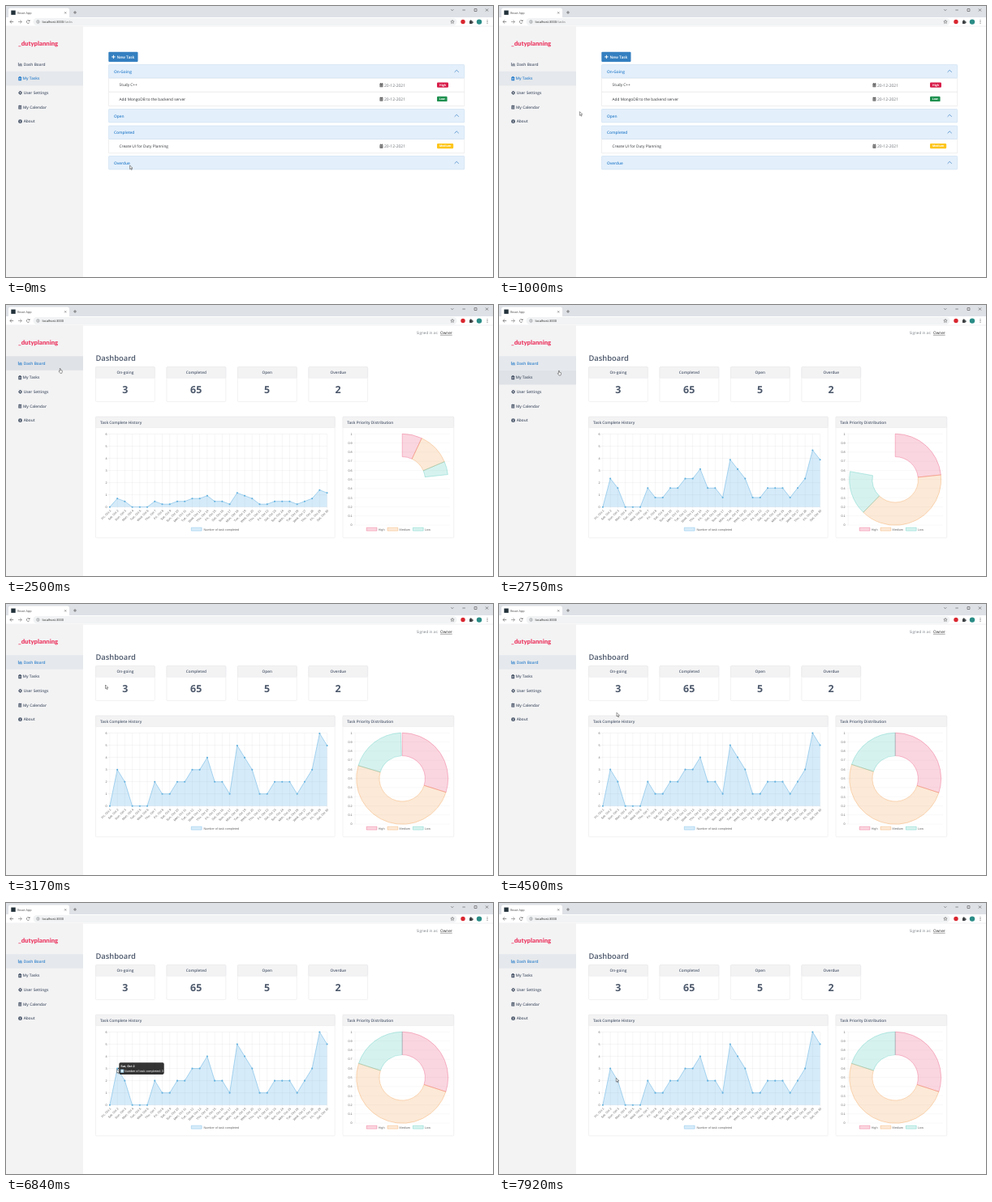
An HTML page with a canvas that plays this animation: 600x335 px, repeating every 8 s.

```html
<!DOCTYPE html>
<html lang="en">
<head>
<meta charset="utf-8">
<title>Task dashboard</title>
<style>
  html, body { margin: 0; width: 100%; height: 100%; overflow: hidden; background: #fff; }
  canvas { display: block; width: 600px; height: 335px; }
</style>
</head>
<body>
<canvas id="stage"></canvas>
<script>
const W = 600, H = 335, LOOP = 8000, STEP = LOOP / 96;
const DASH_AT = 2416, CHART_AT = 2436;
const UI = '"Open Sans", "Noto Sans", sans-serif';
const CHART = '"Liberation Sans", Arial, sans-serif';
const INK = '#4c586b', BLUE = '#2f80cc', GRID = 'rgba(0,0,0,.1)';

const canvas = document.getElementById('stage');
const ctx = canvas.getContext('2d');
const dpr = window.devicePixelRatio || 1;
canvas.width = W * dpr;
canvas.height = H * dpr;
ctx.scale(dpr, dpr);
ctx.textRendering = 'geometricPrecision';

// ---------- drawing helpers ----------
function rect(x, y, w, h, fill, line, r = 0) {
  ctx.beginPath();
  ctx.roundRect(x, y, w, h, r);
  if (fill) { ctx.fillStyle = fill; ctx.fill(); }
  if (line) { ctx.strokeStyle = line; ctx.lineWidth = 0.5; ctx.stroke(); }
}
function disc(x, y, r, fill) {
  ctx.beginPath();
  ctx.arc(x, y, r, 0, Math.PI * 2);
  ctx.fillStyle = fill;
  ctx.fill();
}
function poly(points, line, width = 0.6, fill = null, close = false) {
  ctx.beginPath();
  points.forEach(([x, y], i) => i ? ctx.lineTo(x, y) : ctx.moveTo(x, y));
  if (close) ctx.closePath();
  if (fill) { ctx.fillStyle = fill; ctx.fill(); }
  if (line) { ctx.strokeStyle = line; ctx.lineWidth = width; ctx.stroke(); }
}
// cy is the vertical middle of the capitals
function text(s, x, cy, size, color = INK, weight = 400, align = 'left', font = UI) {
  ctx.font = `${weight} ${size}px ${font}`;
  ctx.textAlign = align;
  ctx.fillStyle = color;
  ctx.fillText(s, x, cy + size * 0.36);
}
const label = (s, x, cy, align = 'left', color = '#666', weight = 400) =>
  text(s, x, cy, 3.75, color, weight, align, CHART);
const clamp = v => Math.max(0, Math.min(1, v));

// ---------- browser frame ----------
function drawBrowser(url, path) {
  rect(0, 0, W, 14, '#dee1e6');
  rect(3, 2.5, 75, 14, '#fff', null, 2.5);
  rect(0, 14, W, 11, '#fff');
  rect(6.3, 5.5, 5.4, 5.4, '#23323a');
  text('React App', 14, 8.3, 3.75, '#444');
  const cross = (x, y, r, c) => {
    poly([[x - r, y - r], [x + r, y + r]], c, 0.5);
    poly([[x + r, y - r], [x - r, y + r]], c, 0.5);
  };
  cross(73.2, 8.4, 1.1, '#444');
  poly([[83, 8], [87, 8]], '#444', 0.6);
  poly([[85, 6], [85, 10]], '#444', 0.6);
  poly([[548.3, 4.2], [549.8, 5.7], [551.3, 4.2]], '#333', 0.5);
  poly([[562.4, 5], [565.8, 5]], '#333', 0.5);
  rect(577, 3.5, 3, 3, null, '#333');
  cross(592.5, 5, 1.6, '#333');

  const arrow = (x, d, c) => {
    poly([[x - 2.2, 19.5], [x + 2.2, 19.5]], c, 0.6);
    poly([[x, 19.5 - 2], [x + 2.2 * d, 19.5], [x, 19.5 + 2]], c, 0.6);
  };
  arrow(7, -1, '#555');
  arrow(17.2, 1, '#777');
  ctx.beginPath();
  ctx.arc(27.3, 19.5, 1.9, 0.4, 5.4);
  ctx.strokeStyle = '#555';
  ctx.lineWidth = 0.6;
  ctx.stroke();
  poly([[29.4, 17.1], [29.4, 19], [27.6, 19]], null, 0, '#555', true);

  rect(33.5, 15, 522, 9, '#f1f3f4', null, 4.5);
  ctx.beginPath();
  ctx.arc(39.4, 19.5, 1.8, 0, Math.PI * 2);
  ctx.strokeStyle = '#5f6368';
  ctx.lineWidth = 0.45;
  ctx.stroke();
  rect(39.15, 19.1, 0.5, 1.4, '#5f6368');
  rect(39.15, 18.2, 0.5, 0.5, '#5f6368');
  text(url, 44.5, 19.5, 3.95, '#222');
  text(path, 44.5 + ctx.measureText(url).width, 19.5, 3.95, '#777');

  const star = Array.from({ length: 10 }, (_, i) => {
    const a = i * Math.PI / 5, r = i % 2 ? 1 : 2.3;
    return [550 + r * Math.sin(a), 19.6 - r * Math.cos(a)];
  });
  poly(star, '#555', 0.5, null, true);
  disc(563, 19.5, 2.7, '#d9252f');
  rect(571, 18.3, 3.6, 3.6, '#3c4043', null, 0.5);
  disc(572.7, 18.1, 0.9, '#3c4043');
  disc(574.9, 20.1, 0.9, '#3c4043');
  disc(583, 19.6, 3.2, '#2a8c86');
  for (const y of [17.7, 19.5, 21.3]) disc(593, y, 0.5, '#444');
  rect(0, 24.8, W, 0.4, '#e4e4e6');
}

// ---------- sidebar ----------
const ROW_TOP = 63.2, ROW_H = 17.65;
const icons = {
  bars(c) {
    poly([[15.4, -2], [15.4, 1.8], [20, 1.8]], c, 0.7);
    [[16.4, 1.4], [17.5, 2.6], [18.6, 2]].forEach(([x, h]) => rect(x, 1.2 - h, 0.8, h, c));
  },
  clipboard(c) {
    rect(15.3, -2, 3.8, 4.5, c, null, 0.5);
    rect(16.3, -2.6, 1.8, 1.3, c, null, 0.4);
    rect(16.1, -0.3, 2.2, 0.4, '#fff');
    rect(16.1, 0.9, 2.2, 0.4, '#fff');
  },
  cog(c) {
    for (let i = 0; i < 4; i++) {
      const a = i * Math.PI / 4, x = 2.4 * Math.cos(a), y = 2.4 * Math.sin(a);
      poly([[17.6 - x, -y], [17.6 + x, y]], c, 1);
    }
    disc(17.6, 0, 1.8, c);
    disc(17.6, 0, 0.8, '#f3f3f4');
  },
  calendar(c) {
    rect(15.3, -1.9, 3.9, 4.4, c, null, 0.5);
    rect(16, -2.6, 0.7, 1.2, c);
    rect(17.8, -2.6, 0.7, 1.2, c);
    rect(15.3, -0.8, 3.9, 0.35, '#f3f3f4');
    for (const y of [0.2, 1.3]) for (const x of [16, 17, 18]) rect(x, y, 0.5, 0.5, '#f3f3f4');
  },
  info(c) {
    disc(17.5, 0, 2.4, c);
    rect(17.2, -0.4, 0.7, 1.8, '#fff');
    rect(17.2, -1.5, 0.7, 0.7, '#fff');
  }
};
const MENU = [
  ['Dash Board', 'bars', 21.7], ['My Tasks', 'clipboard', 20.6], ['User Settings', 'cog', 21.7],
  ['My Calendar', 'calendar', 20.9], ['About', 'info', 21.7]
];
function drawSidebar(active, hover) {
  rect(0, 25, 95, H - 25, '#f3f3f4');
  text('_dutyplanning', 15, 45.8, 7.7, '#ec3f67', 900, 'left', 'Lato, sans-serif');
  MENU.forEach(([name, icon, x], i) => {
    const top = ROW_TOP + i * ROW_H, cy = top + ROW_H / 2;
    if (i === hover) rect(0, top, 95, ROW_H, '#dfe2e7');
    else if (i === active) rect(0, top, 95, ROW_H, '#e5e8ec');
    const color = i === active ? BLUE : INK;
    ctx.save();
    ctx.translate(0, cy);
    icons[icon](color);
    ctx.restore();
    text(name, x, cy, 4.8, color, 600);
  });
}

// ---------- task list ----------
function drawHeader(name, y) {
  rect(126.5, y, 438.2, 16.5, '#e3effb', '#c3d9ee', 0.8);
  text(name, 133, y + 8.4, 4.8, BLUE, 600);
  poly([[552.6, y + 9.3], [555.2, y + 6.8], [557.8, y + 9.3]], '#3b82c4', 0.7);
}
function drawTask(name, y, level, color, width) {
  rect(126.5, y, 438.2, 17.3, '#fff', '#dfdfdf');
  const cy = y + 8.7;
  text(name, 139.6, cy, 4.75, '#303236');
  ctx.save();
  ctx.translate(445.2, cy);
  icons.calendar('#555');
  ctx.restore();
  text('20-12-2021', 466, cy, 5, '#6b6f75');
  rect(531, cy - 3.3, width, 6.4, color, null, 1.2);
  text(level, 531 + width / 2, cy - 0.1, 3.5, '#fff', 700, 'center');
}
function drawTasks() {
  rect(126.3, 56.7, 36.2, 12.3, '#347fc0', null, 1);
  poly([[130.2, 62.9], [134.6, 62.9]], '#fff', 1);
  poly([[132.4, 60.7], [132.4, 65.1]], '#fff', 1);
  text('New Task', 136.4, 62.9, 4.85, '#fff', 600);
  drawTask('Study C++', 89, 'High', '#d81e4b', 14);
  drawTask('Add MongoDB to the backend server', 106.3, 'Low', '#1f9150', 12.6);
  drawTask('Create UI for Duty Planning', 164.5, 'Medium', '#fdc51c', 20.2);
  drawHeader('On-Going', 72.5);
  drawHeader('Open', 127.5);
  drawHeader('Completed', 148);
  drawHeader('Overdue', 185.5);
}

// ---------- dashboard ----------
const DONE = [0, 3, 2, 0, 0, 0, 2, 1, 1, 2, 2, 3, 3, 4, 2, 2, 1, 5, 4, 3, 1, 1, 2, 2, 2, 1, 2, 3, 6, 5];
const DAYS = ['Fri', 'Sat', 'Sun', 'Mon', 'Tue', 'Wed', 'Thu'];
const LINE = { left: 127.9, right: 395.6, top: 159.5, base: 249.7 };
const lineX = i => LINE.left + i * (LINE.right - LINE.left) / 29;
const lineY = v => LINE.base - v * (LINE.base - LINE.top) / 6;

function drawCard(x, y, w, h, head) {
  rect(x, y, w, h, '#fff', '#e4e4e6', 0.8);
  rect(x, y, w, head, '#f3f3f4', '#e4e4e6', 0.8);
}
function drawLineChart(grow) {
  for (let v = 0; v <= 6; v++) {
    poly([[LINE.left - 2.4, lineY(v)], [LINE.right, lineY(v)]], GRID, 0.4);
    label(v, 124.6, lineY(v), 'right');
  }
  DONE.forEach((_, i) => {
    const x = lineX(i);
    poly([[x, LINE.top], [x, LINE.base + 2.4]], GRID, 0.4);
    ctx.save();
    ctx.translate(x + 0.7, LINE.base + 3.6);
    ctx.rotate(-Math.PI / 4);
    label(`${DAYS[i % 7]}, Oct ${i + 1}`, 0, 0.4, 'right');
    ctx.restore();
  });
  const pts = DONE.map((v, i) => [lineX(i), lineY(v * grow)]);
  poly([...pts, [LINE.right, LINE.base], [LINE.left, LINE.base]], null, 0, 'rgba(60,160,225,.21)', true);
  poly(pts, '#84c2e8', 0.7);
  for (const [x, y] of pts) disc(x, y, 1.05, '#62b1de');
  rect(228.3, 275.2, 12.8, 3.9, '#d8ecf9', '#84c2e8');
  label('Number of task completed', 243.4, 277.2);
}

const SLICES = [
  ['High', 0.3, '230,50,100', 444.2], ['Medium', 0.5, '240,145,55', 470], ['Low', 0.2, '50,190,175', 501.4]
];
function drawRing(grow) {
  const cx = 488.2, cy = 215.8, outer = 56.5, inner = 28.2;
  for (let i = 0; i <= 10; i++) {
    const y = 159.3 + i * 11.27;
    poly([[428, y], [547, y]], 'rgba(0,0,0,.08)', 0.4);
    label(i === 0 ? '1' : i === 10 ? '0' : (1 - i / 10).toFixed(1), 426.6, y, 'right');
  }
  poly([[430.2, 159.3], [430.2, 272]], GRID, 0.4);
  let from = -Math.PI / 2;
  for (const [name, share, rgb, x] of SLICES) {
    const to = from + share * grow * Math.PI * 2;
    if (grow > 0) {
      ctx.beginPath();
      ctx.arc(cx, cy, outer, from, to);
      ctx.arc(cx, cy, inner, to, from, true);
      ctx.closePath();
      ctx.fillStyle = `rgba(${rgb},.2)`;
      ctx.fill();
      ctx.strokeStyle = `rgba(${rgb},.6)`;
      ctx.lineWidth = 0.5;
      ctx.stroke();
    }
    from = to;
    rect(x, 275.2, 12.8, 3.9, `rgba(${rgb},.2)`, `rgba(${rgb},.6)`);
    label(name, x + 14.6, 277.2);
  }
}
function drawTooltip(alpha) {
  if (alpha <= 0) return;
  const px = lineX(1), py = lineY(DONE[1]), x = px + 2.2, y = py - 7.3;
  ctx.save();
  ctx.globalAlpha = alpha;
  rect(x, y, 55.4, 14.6, 'rgba(0,0,0,.8)', null, 1.8);
  poly([[x, py - 1.6], [x - 1.6, py], [x, py + 1.6]], null, 0, 'rgba(0,0,0,.8)', true);
  label('Sat, Oct 2', x + 1.9, y + 4.1, 'left', '#fff', 700);
  rect(x + 2, y + 8.6, 3.6, 3.6, '#d8ecf9', '#84c2e8');
  label('Number of task completed: 3', x + 6.6, y + 10.5, 'left', '#fff');
  ctx.restore();
}
function drawDashboard(t) {
  text('Signed in as:', 505.8, 34.4, 4.6, '#7b8087');
  text('Owner', 535, 34.4, 4.7, '#222');
  rect(535, 36.9, ctx.measureText('Owner').width, 0.4, '#222');
  text('Dashboard', 110.4, 65.3, 9.4, INK, 600);
  [['On-going', 3], ['Completed', 65], ['Open', 5], ['Overdue', 2]].forEach(([name, n], i) => {
    const x = 110.5 + i * 87.45;
    drawCard(x, 76.6, 72.8, 42.8, 13.7);
    text(name, x + 36.4, 83.5, 4.75, INK, 600, 'center');
    text(n, x + 36.2, 105, 12.4, INK, 700, 'center');
  });
  drawCard(110.5, 138.2, 294.7, 149.6, 13.4);
  text('Task Complete History', 116, 145, 4.75, INK, 600);
  drawCard(415, 138.2, 136.7, 149.6, 13.4);
  text('Task Priority Distribution', 420.3, 145, 4.75, INK, 600);
  const grow = 1 - Math.pow(1 - clamp((t - CHART_AT) / 1000), 4);
  drawLineChart(grow);
  drawRing(grow);
  drawTooltip(clamp((t - 6560) / 200) - clamp((t - 7570) / 200));
}

// ---------- pointer ----------
const PATH = [
  [0, 152.6, 197], [90, 152.6, 197], [840, 110, 145], [1330, 67.5, 87.5], [1500, 67.5, 87.5],
  [1680, 66, 79], [2250, 65.4, 78.5], [2650, 65.4, 78.5], [3100, 122.5, 100], [3250, 122.5, 100],
  [4080, 131.5, 110.5], [4500, 145, 134.3], [4840, 147, 111], [5100, 147, 111], [5920, 142.4, 205.4],
  [6000, 142.4, 205.4], [6340, 140.5, 204.3], [6480, 140.5, 204.3], [6750, 136.6, 205.5],
  [7540, 136.6, 205.5], [7900, 144.3, 216.4], [8000, 144.3, 216.4]
];
function pointerAt(t) {
  const i = Math.max(1, PATH.findIndex(k => k[0] >= t));
  const [t0, x0, y0] = PATH[i - 1], [t1, x1, y1] = PATH[i];
  const p = clamp((t - t0) / (t1 - t0)), e = p * p * (3 - 2 * p);
  return [x0 + (x1 - x0) * e, y0 + (y1 - y0) * e];
}
function drawPointer(x, y, hand) {
  ctx.save();
  ctx.translate(x, y);
  ctx.lineJoin = 'round';
  if (hand) {
    poly([[0.9, 0], [1.7, 0], [1.9, 2], [3.7, 2.4], [3.9, 4], [3.3, 5.8], [1.4, 5.8], [-0.4, 3.6],
      [0, 3], [0.8, 3.5]], '#333', 0.5, '#fff', true);
  } else {
    poly([[0, 0], [0, 4.7], [1.1, 3.8], [1.9, 5.6], [2.7, 5.2], [1.9, 3.5], [3.4, 3.4]],
      '#333', 0.5, '#fff', true);
  }
  ctx.restore();
}

function draw(t) {
  const dash = t >= DASH_AT;
  const [x, y] = pointerAt(t);
  const row = Math.floor((y - ROW_TOP) / ROW_H);
  const hover = x < 95 && row >= 0 && row < MENU.length ? row : -1;
  rect(0, 0, W, H, '#fff');
  drawBrowser('localhost:3000', dash ? '' : '/tasks');
  drawSidebar(dash ? 0 : 1, hover);
  if (dash) drawDashboard(t); else drawTasks();
  drawPointer(x, y, hover >= 0);
}

function tick() {
  const t = performance.now() % LOOP;
  draw(Math.floor(t / STEP + 0.02) * STEP % LOOP);
  requestAnimationFrame(tick);
}
tick();
</script>
</body>
</html>
```
